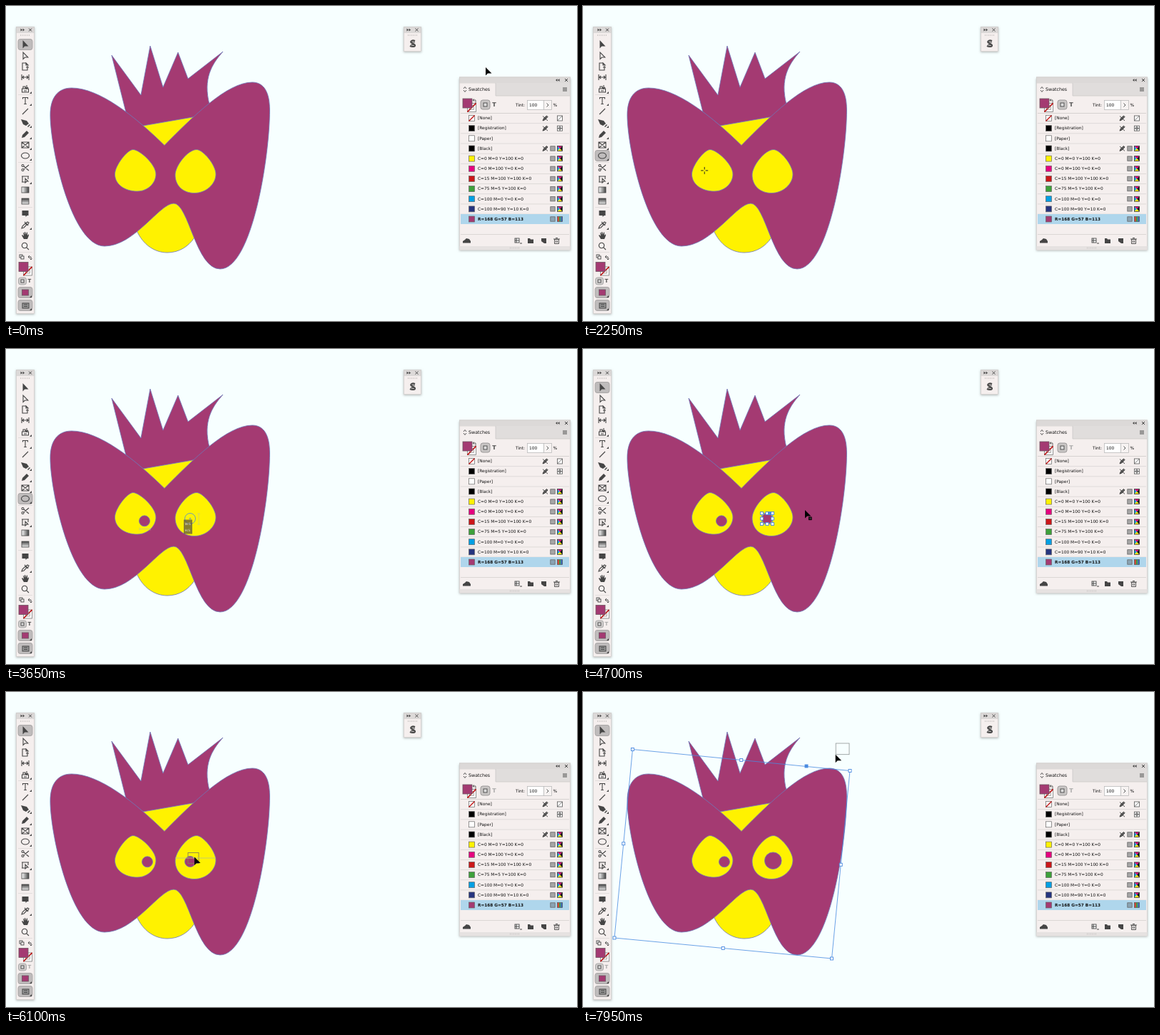
Animation, 800 px wide and 442 px high, one loop 8 s. Source, as an HTML page with a canvas:

```html
<!DOCTYPE html>
<html lang="en">
<head>
<meta charset="utf-8">
<title>Mask drawing</title>
<style>
html, body { margin: 0; width: 100%; height: 100%; overflow: hidden; background: #f7ffff; }
canvas { display: block; width: 800px; height: 442px; }
</style>
</head>
<body>
<canvas id="stage" width="800" height="442"></canvas>
<script>
const c = document.getElementById('stage').getContext('2d');
c.textRendering = 'geometricPrecision';
const LOOP = 8000;
const PURPLE = '#a43a72', YELLOW = '#fff200', INK = '#454545', EDGE = '#6d78b8';
const PANEL = '#f5efee', BAR = '#dcd9d8', PRESSED = '#bfbcbc', BLUE = '#4a8be0';
const FONT = '"DejaVu Sans", Verdana, sans-serif';

function box(x, y, w, h, fill, stroke, lw = 1) {
  if (fill) { c.fillStyle = fill; c.fillRect(x, y, w, h); }
  if (stroke) { c.strokeStyle = stroke; c.lineWidth = lw; c.strokeRect(x, y, w, h); }
}
function shape(d, fill, stroke, lw = 1, x = 0, y = 0) {
  const p = typeof d === 'string' ? new Path2D(d) : d;
  c.save();
  c.translate(x, y);
  if (fill) { c.fillStyle = fill; c.fill(p); }
  if (stroke) { c.strokeStyle = stroke; c.lineWidth = lw; c.stroke(p); }
  c.restore();
}
function disc(x, y, r, fill, stroke, lw = 0.8) {
  const p = new Path2D();
  p.arc(x, y, r, 0, 7);
  shape(p, fill, stroke, lw);
}
function text(s, x, y, size = 5.85, color = '#111', weight = '') {
  c.font = `${weight} ${size}px ${FONT}`;
  c.fillStyle = color;
  c.textBaseline = 'middle';
  c.fillText(s, x, y);
}
function pill(x, y, w, h, fill, stroke) {
  const p = new Path2D();
  p.roundRect(x, y, w, h, 3);
  shape(p, fill, stroke);
}
function panel(x, y, w, h) {
  c.save();
  c.shadowColor = 'rgba(0,0,0,.28)';
  c.shadowBlur = 3;
  c.shadowOffsetY = 1;
  box(x, y, w, h, PANEL);
  c.restore();
  box(x, y, w, 9, BAR);
  box(x + 0.5, y + 0.5, w - 1, h - 1, null, '#cfcccb', 0.8);
}
function closeMark(x, y) { shape('M-2-2L2 2M2-2L-2 2', null, '#444', 1, x, y); }
function chevrons(x, y, dir) {
  c.save();
  c.translate(x, y);
  c.scale(dir, 1);
  shape('M-2.5-2L0 0L-2.5 2ZM.5-2L3 0L.5 2Z', '#444');
  c.restore();
}
function grip(x, y) {
  for (let i = 0; i < 6; i++) box(x + i * 2.4, y, 1, 2, '#cbc7c6');
}
function noneBox(x, y, s) {
  box(x, y, s, s, '#fff', '#777', 0.8);
  shape(`M${x} ${y + s}L${x + s} ${y}`, null, '#c01818', 1.5);
}
function fillStroke(x, y, s) {
  noneBox(x + 6.5, y + 6.5, s - 1);
  box(x + 9.5, y + 9.5, s - 7, s - 7, PANEL, '#888', 0.7);
  shape(`M${x + 6.5} ${y + s + 5.5}L${x + s + 5.5} ${y + 6.5}`, null, '#c01818', 1.3);
  box(x, y, s, s, PURPLE, '#6b5560', 0.8);
}

// Tools: centre y, path, style (s = stroke, f = fill), has submenu
const ARROW = 'M-3.5-6V5.5L-.8 2.5H4.5Z';
const TOOLS = [
  [54, ARROW, 'f'],
  [70, 'M-3-5V4.5L-.5 2H3.8Z', 's'],
  [85, 'M1-5H-4V5H3V2M1-5L4-2H1ZM1 1H5M3-1V3', 's'],
  [100, 'M-5-4V4M5-4V4M-4 0H4M-2-2L-4 0L-2 2M2-2L4 0L2 2', 's'],
  [116, 'M-4.5 0V5H4.5V0ZM-3 0V-3H0V0M2-5V1M0-2L2 0L4-2M-2 3H2', 's', 1],
  [133, 'M-3.5-2.5V-4.5H3.5V-2.5M0-4.5V4.5M-1.8 4.5H1.8', 's', 1],
  [148, 'M-4 4L4-4', 's'],
  [164, 'M-6-5L2-3L5 1L1 4L-3 2ZM3 5L6 2L7 3L4 6Z', 'f', 1],
  [180, 'M-5 5L-4 1L2-5L5-2L-1 4Z', 'f', 1],
  [195, 'M-5-4H5V4H-5ZL5 4M5-4L-5 4', 's', 1],
  [210, 'M-5.5 0A5.5 4 0 1 0 5.5 0A5.5 4 0 1 0-5.5 0', 's', 1],
  [227, 'M5-4L-2 2M5 4L-2-2M-5-3A1.5 1.5 0 1 0-2-3A1.5 1.5 0 1 0-5-3M-5 3A1.5 1.5 0 1 0-2 3A1.5 1.5 0 1 0-5 3', 's'],
  [243, 'M-5-4H5M-4-4V4M-5 4H0M4-4V0M0-1V5L2 3H4Z', 's', 1],
  [258, '', 'g'],
  [274, '', 'v'],
  [291, 'M-4.5-4H4.5V3H2.5L.5 5V3H-4.5Z', 'f'],
  [307, 'M-5 5L-4 2L0-2L2 0L-2 4ZM-1-4L4 1M1-2L3-4L5-3L4-1L2 0', 's', 1],
  [322, 'M-2 5L-5 0L-4-1L-2 1L-3-4L-2-4L-1-1V-5H0L1-1L2-4.5H3V0L5-2V0L3 5Z', 'f'],
  [337, 'M-4.7-1A3.7 3.7 0 1 0 2.7-1A3.7 3.7 0 1 0-4.7-1M1.8 1.8L5 5', 's']
];

function toolbar(active, hover, tone) {
  panel(14, 29, 26, 403);
  chevrons(23, 33.5, 1);
  closeMark(34, 33.5);
  grip(20, 40);
  for (const y of [124, 219, 282, 345]) box(17, y, 20, 0.8, '#dedada');
  for (const [y, d, kind, sub] of TOOLS) {
    if (y === active) pill(17, y - 7.5, 20, 15, PRESSED, '#a9a6a6');
    else if (y === hover) pill(17, y - 7.5, 20, 15, '#dedada', '#c6c3c3');
    if (kind === 'f') shape(d, INK, null, 1, 27, y);
    else if (kind === 's') shape(d, null, INK, 1.1, 27, y);
    else {
      const g = kind === 'g' ? c.createLinearGradient(22, 0, 32, 0) : c.createLinearGradient(0, y - 4, 0, y + 4);
      g.addColorStop(0, kind === 'g' ? '#fff' : '#444');
      g.addColorStop(1, kind === 'g' ? '#444' : '#eee');
      box(22, y - 4, 10, 8, g, INK, 0.8);
    }
    if (sub) shape(`M36 ${y + 4}V${y + 7}H33Z`, INK);
  }
  box(19, 349, 4, 4, '#fff', INK, 0.9);
  box(21, 351, 4, 4, PANEL, INK, 0.9);
  shape('M31 352H35V356M33 350L31 352L33 354M33.5 354.5L35 356L36.5 354.5', null, INK, 0.9);
  fillStroke(18, 359.5, 13);
  pill(17.5, 381, 11, 10, '#cfcccb', '#aaa');
  box(21, 384, 4, 4, '#ddd', INK, 0.9);
  text('T', 30.5, 386.5, 7, tone, 'bold');
  pill(17, 394.5, 20, 15, PRESSED, '#a9a6a6');
  box(22.5, 398, 9, 8, PURPLE, '#6b5560', 0.8);
  pill(17, 412.5, 20, 15, PRESSED, '#a9a6a6');
  box(23, 417, 9, 7, '#999', INK, 1);
  shape('M25 419H30M25 421.5H30', null, INK, 1);
  shape('M36 406V409H33ZM36 424V427H33Z', INK);
}

const SWATCHES = [
  ['[None]', ''], ['[Registration]', '#000'], ['[Paper]', '#fff'], ['[Black]', '#000'],
  ['C=0 M=0 Y=100 K=0', YELLOW], ['C=0 M=100 Y=0 K=0', '#e5007e'],
  ['C=15 M=100 Y=100 K=0', '#cb1719'], ['C=75 M=5 Y=100 K=0', '#3da03a'],
  ['C=100 M=0 Y=0 K=0', '#009fe3'], ['C=100 M=90 Y=10 K=0', '#25347f'],
  ['R=168 G=57 B=113', PURPLE]
];

function swatchRow([name, color], i) {
  const y = 157.5 + i * 14.15, last = i === 10;
  if (last) box(637, y - 7, 152, 14, '#afd6ec');
  else box(637, y + 6.8, 152, 0.8, '#d9d5d4');
  if (color) box(648.5, y - 4, 8, 8, color, '#666', 0.7);
  else noneBox(648.5, y - 4, 8);
  text(name, 661, y + 0.3, last ? 5.75 : 5.85, '#111', last ? 'bold' : '');
  if (i < 2 || i === 3) shape('M-3.5 3.5L-2 0L2-3.5L3.5-2L0 2ZM-3.5-3L3.5 3.5', '#666', '#333', 0.9, 755.5, y);
  if (i > 2) box(762.8, y - 3.2, 6.4, 6.4, last ? '#8aa3b3' : '#a5a5a5', '#666', 0.8);
  const x = 772.5, top = y - 3.5;
  if (i === 0) {
    box(x, top, 7, 7, '#fff', '#555', 0.8);
    shape(`M${x} ${top + 7}l7-7`, null, '#555', 0.8);
  } else if (i === 1) {
    box(x, top, 7, 7, '#fff', '#555', 0.8);
    shape(`M${x} ${y}h7M${x + 3.5} ${top}v7`, null, '#555', 0.8);
    disc(x + 3.5, y, 1.8, null, '#555', 0.7);
  } else if (last) {
    ['#d8402c', '#3f9b4c', '#3563b5'].forEach((f, k) => box(x + k * 2.4, top, 2.4, 7, f));
    box(x, top, 7, 7, null, '#555', 0.7);
  } else if (i > 2) {
    shape('M-3.5 3.5V-3.5L0 0Z', '#00a0e0', null, 1, x + 3.5, y);
    shape('M-3.5-3.5H3.5L0 0Z', '#e5007e', null, 1, x + 3.5, y);
    shape('M3.5 3.5H-3.5L0 0Z', '#fff000', null, 1, x + 3.5, y);
    shape('M3.5-3.5V3.5L0 0Z', '#111', null, 1, x + 3.5, y);
    box(x, top, 7, 7, null, '#333', 0.8);
  }
}

function swatchPanel(tone) {
  panel(635, 99.5, 156, 243);
  chevrons(773, 104, -1);
  closeMark(785, 104);
  box(686, 108, 104, 18, '#e0dddc');
  shape('M686 108V126H790', null, '#cbc8c7', 0.8);
  shape('M641 116L643 113.5L645 116M641 118L643 120.5L645 118', null, INK, 0.9);
  text('Swatches', 648, 117.3, 6.3);
  for (let k = 0; k < 3; k++) box(780, 114.5 + k * 2, 6, 1, '#555');
  fillStroke(640, 130, 13);
  shape('M654 132H658V136M656 130.5L654 132L656 133.5', null, INK, 0.8);
  pill(665, 132, 13, 13, '#c9c6c5', '#9b9898');
  box(669, 136, 5, 5, '#ddd', INK, 0.9);
  text('T', 681.2, 139, 8, tone, 'bold');
  text('Tint:', 714, 139);
  box(730.5, 132.5, 23, 13, '#fff', '#bbb', 0.8);
  text('100', 733, 139.3);
  box(753.5, 132.5, 11, 13, '#f7f3f2', '#bbb', 0.8);
  shape('M757.5 136.5L760 139L757.5 141.5', null, '#555', 1);
  text('%', 766.5, 139.3);
  box(637, 150, 152, 0.8, '#cfcbca');
  SWATCHES.forEach(swatchRow);
  box(637, 320, 152, 0.8, '#d5d1d0');
  shape('M640 332.5V330L643 328L645 326L649 327L651 330V332.5Z', INK);
  box(713, 326, 6, 6, '#fff', INK, 0.9);
  shape('M715 326V332M713 329H719M720 333H723', null, INK, 1);
  shape('M731 326H734L735 327.5H739V333H731Z', INK);
  shape('M750 326H757V333H754L750 330Z', INK);
  shape('M768.5 327.5H774.5V333.5H768.5ZM767 327H776M770 325.5H773M770.5 329V332M772.5 329V332', null, INK, 0.9);
  box(635.5, 337, 155, 5, '#e6e2e1');
  grip(706, 338.5);
}

function scriptPanel() {
  panel(557, 29, 25, 35);
  chevrons(564, 33.5, 1);
  closeMark(575.5, 33.5);
  grip(563, 40);
  shape('M3-4C-1-5.5-3.5-3.5-2.5-2C-1.5 0 3 0 3 2.2C3 4.2-1 4.5-4 3', null, INK, 2.2, 570, 53);
  shape('M-1-2H3M-3 1.5H1', null, INK, 1.2, 570, 53);
}

const HEAD = 'M183 315C192 335 208 346 226 346C243 346 256 337 264 325L275 300L235 260L175 300Z';
const CROWN = 'M148 69L189 125L202 56L220 114L241 65L255 102L304 64C288 82 276 102 285 138L264 155.5L192 168L168 149Z';
const MASK = 'M92 115C130 115 180 154 222 195.5C262 155 310 107 345 107C362 107 369.5 122 369.5 146' +
  'C369.5 210 345 369 300 369C266 369 256 277 235 277C215 277 180 337 138 337C92 337 62 200 62 153C62 128 73 115 92 115Z';
const EYES = ['M152.5 236C152.5 224 170 201.5 178 201.5C187 201.5 210 222 210 236C210 249 198 260 184 260C166 260 152.5 250 152.5 236Z',
  'M237 237C237 224 255 201.5 267 201.5C276 201.5 294 223 294 236C294 250 280 262.5 264 262.5C248 262.5 237 252 237 237Z'];
const maskPath = new Path2D(MASK);

function artwork() {
  shape(HEAD, YELLOW, EDGE, 0.8);
  shape('M192 168L264 155.5L275 160L222 205L180 165Z', YELLOW);
  shape(CROWN, PURPLE, EDGE, 0.8);
  shape(MASK, PURPLE, EDGE, 0.8);
  EYES.forEach(d => shape(d, YELLOW, EDGE, 0.8));
}

function handle(x, y, fill = '#fff') { box(x - 2, y - 2, 4, 4, fill, BLUE, 0.9); }
// Bounding frame with handles on corners and edge middles
function frame(pts, dot) {
  shape('M' + pts.map(p => p.join(' ')).join('L') + 'Z', null, BLUE, 0.8);
  pts.forEach(([x, y], i) => {
    const [u, v] = pts[(i + 1) % 4];
    handle(x, y);
    handle((x + u) / 2, (y + v) / 2);
  });
  handle(...dot, BLUE);
}
function selectDisc(x, y, r) {
  frame([[x - r, y - r], [x + r, y - r], [x + r, y + r], [x - r, y + r]], [x + r * 0.45, y - r]);
}

const PATH = [
  [1000, 672, 86], [1450, 27, 208], [1850, 27, 208], [2350, 186.5, 233.5], [2600, 186.5, 233.5],
  [2900, 201.5, 248.5], [3100, 201.5, 248.5], [3440, 265.5, 230.5], [3480, 265.5, 230.5],
  [3640, 250.5, 245.5], [3950, 250.5, 245.5], [4300, 27, 52], [4400, 27, 52], [4690, 311, 226],
  [4850, 311, 226], [5150, 193, 240], [5250, 193, 240], [5500, 197, 237], [5650, 197, 237],
  [5890, 259.5, 236.5], [5940, 259.5, 236.5], [6090, 264, 231.5], [6250, 264, 231.5],
  [6450, 270, 240.5], [6550, 270, 240.5], [6950, 278, 248.5], [7250, 278, 248.5],
  [7650, 373, 72], [7700, 373, 72], [7940, 353.7, 87.7]
];
function pointer(t) {
  const i = PATH.findIndex(k => k[0] > t);
  if (i === 0) return PATH[0].slice(1);
  if (i < 0) return PATH[PATH.length - 1].slice(1);
  const [t0, x0, y0] = PATH[i - 1], [t1, x1, y1] = PATH[i];
  const u = (t - t0) / (t1 - t0), e = u * u * (3 - 2 * u);
  return [x0 + (x1 - x0) * e, y0 + (y1 - y0) * e];
}

function sizeTip(x, y, w, h) {
  box(x - 1.5, y - 6, 12, 20, 'rgba(84,76,72,.7)');
  text('W:' + Math.round(w / 3), x, y, 4.4, '#eee');
  text('H:' + Math.round(h / 3), x, y + 9, 4.4, '#eee');
}
function newDisc(x0, y0, x, y) {
  const cx = (x0 + x) / 2, cy = (y0 + y) / 2, r = Math.abs(x - x0) / 2;
  disc(cx, cy, r, null, BLUE);
  shape('M-1.5 0H1.5M0-1.5V1.5', null, BLUE, 0.7, cx, cy);
  sizeTip(x, y, 2 * r, 2 * r);
}

function cursor(x, y, drawing, dragging) {
  if (x < 41) shape('M0 0V11L2.6 8.6L4.4 12.4L6.2 11.6L4.5 8H8Z', '#fff', '#222', 0.9, x, y);
  else if (drawing) {
    if (!dragging) shape('M-5 0H-1.5M1.5 0H5M0-5V-1.5M0 1.5V5', null, '#222', 1, x, y);
  } else {
    shape('M0 0V11.5L3 8.5H8.5Z', '#000', null, 1, x, y);
    if (!dragging && c.isPointInPath(maskPath, x, y)) box(x + 5.5, y + 10, 3.6, 3.6, '#333', '#000', 1);
  }
}

function draw(t) {
  const within = (a, b) => t >= a && t < b;
  const [x, y] = pointer(t);
  const drawing = within(1700, 4370);
  const first = within(2600, 3100), second = within(3460, 3700);
  const dragLeft = within(5250, 5500), dragRight = within(5940, 6250), resize = within(6550, 6980);
  const plain = t < 3100 || within(3450, 3700) || within(4800, 5200) || within(7300, 7500);
  const tone = plain ? '#505050' : '#aaa';

  c.fillStyle = '#f7ffff';
  c.fillRect(0, 0, 800, 442);
  artwork();

  const left = t < 5500 ? [194, 241.3, 7.5] : [198, 238.3, 7.5];
  const right = t < 6250 ? [258, 238, 7.5] : t < 6980 ? [262.5, 233, 7.5] : [266.3, 236.7, 11.8];
  if (t >= 3100) disc(...left, PURPLE, EDGE);
  if (t >= 3700) disc(...right, PURPLE, EDGE);

  if (first) newDisc(186.5, 233.5, x, y);
  if (second) {
    newDisc(265.5, 230.5, x, y);
    if (t > 3600) shape('M187 252.5H202M187 250.5V254.5M202 250.5V254.5M270 231V246M268 231H272M268 246H272',
      null, 'rgba(190,200,150,.8)', 0.8);
  }
  if (within(3100, 3450) || (within(5200, 5900) && !dragLeft)) selectDisc(...left);
  if (within(3700, 4800) || (within(5900, 7300) && !dragRight && !resize)) selectDisc(...right);
  if (dragLeft) box(186.5 + x - 193, 233.8 + y - 240, 15, 15, null, BLUE, 0.8);
  if (dragRight) {
    box(250.5 + x - 259.5, 230.5 + y - 236.5, 15, 15, null, '#8a7f55', 0.9);
    if (t > 6070) box(237, 232.6, 57, 0.8, '#b7c08a');
  }
  if (resize) box(255, 225.5, x - 255, y - 225.5, null, BLUE, 0.8);
  if (t >= 7500) frame([[69.5, 80.5], [374, 110.5], [348.5, 374], [44, 345]], [313, 104]);
  if (t >= 7700) box(x + 0.5, 72, 372.5 - x, y - 72, null, '#8f9595', 0.8);

  const hover = x < 41 ? (TOOLS.find(k => Math.abs(k[0] - y - 2) < 8) || [0])[0] : 0;
  toolbar(drawing ? 210 : 54, hover, tone);
  scriptPanel();
  swatchPanel(tone);
  cursor(x, y, drawing, first || second || dragLeft || dragRight || resize);
}

function tick() {
  draw(performance.now() % LOOP);
  requestAnimationFrame(tick);
}
tick();
</script>
</body>
</html>
```
